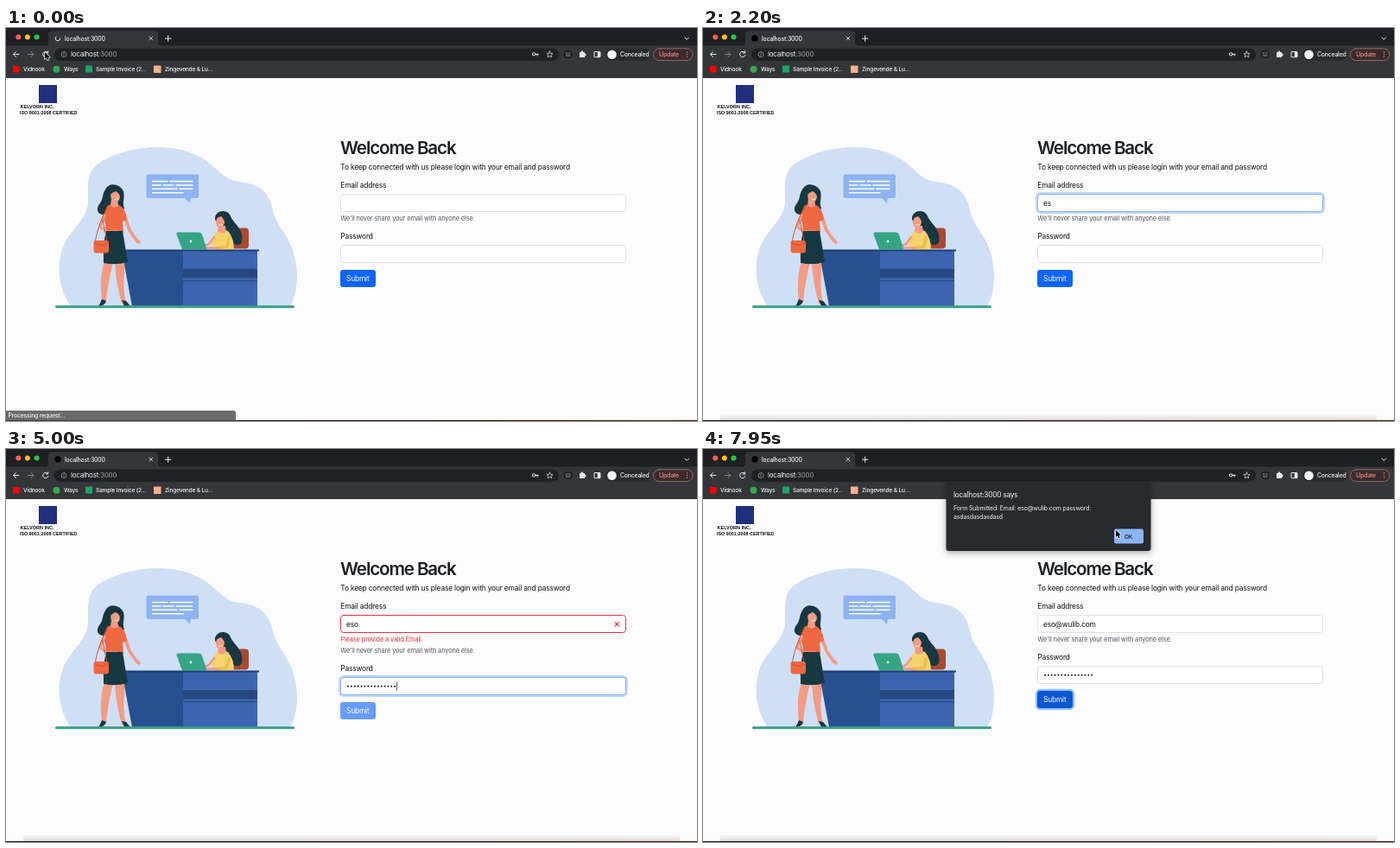
An HTML page with a canvas that plays this animation: 800x455 px, repeating every 8000 ms.

```html
<!DOCTYPE html>
<html lang="en">
<head>
<meta charset="utf-8">
<title>Login form</title>
<style>
html, body { margin: 0; width: 100%; height: 100%; overflow: hidden; background: #fcfcfc; }
canvas { display: block; width: 800px; height: 455px; }
</style>
</head>
<body>
<canvas id="stage"></canvas>
<script>
const LOOP = 8000;
const canvas = document.getElementById('stage');
const c = canvas.getContext('2d');
const dpr = window.devicePixelRatio || 1;
canvas.width = 800 * dpr;
canvas.height = 455 * dpr;

const EMAIL = 'eso@wulib.com';
const PASSWORD = 'asd'.repeat(5);
const FIRST_KEYS = [1500, 1620, 2400, 5650, 5850];
const emailKey = i => i < 5 ? FIRST_KEYS[i] : 5880 + (i - 4) * 100;
const passKey = i => 3560 + i * 100;
const T = { load: 650, email: 1000, pass: 3150, back: 5300, valid: emailKey(4), submit: 7000, dialog: 7700 };
const ERROR_SHIFT = 13;

// Pointer moves: start, end, then the two positions
const MOVES = [
  [0, 350, 45, 28, 45, 28],
  [350, 950, 45, 28, 454, 202],
  [950, 1500, 454, 202, 454, 202],
  [2850, 3100, 454, 202, 450, 263],
  [3100, 3560, 450, 263, 450, 263],
  [5050, 5270, 450, 263, 440, 203],
  [5270, 5650, 440, 203, 440, 203],
  [6740, 6980, 440, 203, 401, 296],
  [6980, 7140, 401, 296, 399, 301],
  [7140, 7700, 399, 301, 399, 301],
  [7700, 7930, 399, 301, 478, 94],
  [7930, 8001, 478, 94, 478, 94]
];

const clamp = v => Math.max(0, Math.min(1, v));
const ease = v => v * v * (3 - 2 * v);
const ramp = (t, start, length = 150) => ease(clamp((t - start) / length));
const between = (t, a, b) => t >= a && t < b;

function text(str, x, y, size, color, weight = 400, spacing = -0.02, family = 'Inter') {
  c.font = `${weight} ${size}px ${family}, sans-serif`;
  c.letterSpacing = `${spacing * size}px`;
  c.fillStyle = color;
  c.fillText(str, x, y);
  return c.measureText(str).width;
}

// Small labels of the browser itself
const label = (str, x, y, size, color = '#f1f3f4', weight = 500) => text(str, x, y, size, color, weight, -0.03);

function rect(x, y, w, h, color, r = 0) {
  c.fillStyle = color;
  c.beginPath();
  c.roundRect(x, y, w, h, r);
  c.fill();
}

function frame(x, y, w, h, color, r, width) {
  c.strokeStyle = color;
  c.lineWidth = width;
  c.beginPath();
  c.roundRect(x, y, w, h, r);
  c.stroke();
}

function dot(x, y, r, color) {
  c.fillStyle = color;
  c.beginPath();
  c.arc(x, y, r, 0, 7);
  c.fill();
}

function oval(x, y, rx, ry, color, angle = 0) {
  c.fillStyle = color;
  c.beginPath();
  c.ellipse(x, y, rx, ry, angle, 0, 7);
  c.fill();
}

function shape(d, color) {
  c.fillStyle = color;
  c.fill(new Path2D(d));
}

function line(d, color, width = 1) {
  c.strokeStyle = color;
  c.lineWidth = width;
  c.lineCap = c.lineJoin = 'round';
  c.stroke(new Path2D(d));
}

function drawBrowser(t) {
  rect(0, 0, 800, 21, '#1f2023');
  rect(0, 20.5, 800, 37.5, '#35363a');
  shape('M45 21Q49 21 49 17V7Q49 3.500 53 3.500H172Q176 3.500 176 7V17Q176 21 180 21Z', '#35363a');
  ['#fe5f57', '#febc2e', '#28c840'].forEach((color, i) => dot(14.300 + i * 10.600, 10.500, 3, color));

  if (t < T.load) {
    c.strokeStyle = '#d7e3fa';
    c.lineWidth = 1;
    c.beginPath();
    const a = t / 140;
    c.arc(60, 12, 2.800, a, a + 4);
    c.stroke();
  } else {
    dot(60, 12, 3.700, '#000');
  }
  label('localhost:3000', 68, 14.700, 6.900);
  line('M166 10.200l3.600 3.600M169.600 10.200l-3.600 3.600', '#e8eaed', 0.900);
  line('M184.500 12.200h6.400M187.700 9v6.400', '#e8eaed');
  line('M786 11l2.300 2.300l2.300 -2.300', '#e8eaed');

  line('M15 30.500H8.600M11.500 27.500L8.500 30.500L11.500 33.500', '#e8eaed');
  line('M25.500 30.500H31.800M28.900 27.500L31.900 30.500L28.900 33.500', '#85878b');
  line('M48.300 28.400A3.200 3.200 0 1 0 48.900 31.500M48.700 26.800V29H46.500', '#e8eaed');

  rect(56, 23.500, 584, 14.500, '#202124', 7.200);
  frame(64, 27.600, 6, 6, '#aeb1b5', 3, 0.700);
  line('M67 30.300V32M67 29.200V29.250', '#aeb1b5', 0.700);
  const w = label('localhost', 75, 33.400, 8, '#f1f3f4', 400);
  label(':3000', 75 + w, 33.400, 8, '#9aa0a6', 400);

  frame(609.500, 28.800, 3.200, 3.200, '#d5d7da', 1.600, 1.100);
  line('M613 30.400H616.200M615 30.400V32', '#d5d7da', 1.100);
  line('M629.500 27l1.050 2.300l2.500 .300l-1.850 1.700l.500 2.500l-2.200 -1.250l-2.200 1.250l.500 -2.500l-1.850 -1.700l2.500 -.300Z', '#d5d7da', 0.800);
  frame(646.800, 27, 8, 7, '#111', 1.500, 1);
  line('M648.500 32h4.600M648.500 29h1M652 29h1', '#8e9194', 0.900);
  rect(664, 28, 6.200, 6, '#e8eaed', 0.800);
  dot(667, 27.900, 1.300, '#e8eaed');
  dot(670.400, 31, 1.300, '#e8eaed');
  frame(681, 27.500, 7, 6.200, '#e8eaed', 0.600, 1);
  rect(684.800, 27.500, 3.200, 6.200, '#e8eaed');
  rect(694, 23.700, 52, 14, '#292a2d', 7);
  dot(701.500, 30.700, 5.300, '#f1f3f4');
  label('Concealed', 711, 33.300, 6.900);
  rect(749.500, 23.800, 45.500, 13.800, '#3b2b2d', 6.900);
  frame(749.500, 23.800, 45.500, 13.800, '#b98582', 6.900, 0.700);
  label('Update', 756, 33.300, 7, '#f28b82');
  [28, 30.700, 33.400].forEach(y => dot(788.500, y, 0.700, '#f28b82'));

  rect(8, 44, 7.500, 7.500, '#f00', 0);
  dot(58.500, 47.700, 4, '#34a853');
  rect(92, 43.500, 8, 8, '#1fa463');
  rect(171, 43.500, 8.500, 8.500, '#f3b28c');
  [['Vidnook', 20], ['Ways', 67], ['Sample Invoice (2...', 104], ['Zingevende & Lu...', 184]]
    .forEach(([name, x]) => label(name, x, 50.200, 6.600));
}

function drawLogo() {
  rect(38, 66, 21, 21, '#20307c');
  text('KELVORN INC.', 16.500, 93, 5.500, '#111', 700, 0, 'Liberation Sans');
  text('ISO 9001:2008 CERTIFIED', 16, 99.700, 5.400, '#111', 700, 0, 'Liberation Sans');
}

function drawSeated(dark, skin) {
  rect(261, 231.500, 20, 24, '#a94a32', 4);
  shape('M242 222C241 210 257 209 260 218C264 227 276 233 273 248C269 254 260 252 258 240L250 232Z', dark);
  shape('M243 236Q250 232 257 235Q264 243 264 257H242L237 249Z', '#f5d36d');
  shape('M246 229H254L255 236Q249 240 245 235Z', skin);
  oval(248, 224.500, 5, 6.800, skin, 0.150);
  shape('M242 221Q245 211 253 214Q259 219 255 231Q253 221 249 218Q246 219 242 221Z', dark);
  line('M246.500 228Q248.500 229.500 250.500 227.500', '#fff', 0.900);
  line('M241 242L235 250L226 254', skin, 2.800);
  line('M258 243L256 253L247 254.500', '#efbe4c', 3.800);
  line('M246 254.500H233', skin, 2.500);
}

function drawStanding(dark, skin, red) {
  shape('M115 187C119 178 132 180 136 189C138 198 134 201 137 209C133 214 121 209 118 216C107 218 103 211 108 204C113 198 111 193 115 187Z', dark);
  shape('M114 270H124C121 287 118 294 116 318L111 319C110 300 108 290 114 270Z', skin);
  shape('M126 270H137C138 286 134 297 139 318L134 319C130 302 127 292 126 270Z', skin);
  shape('M111 314L116 316Q114 322 107 322Q109 319 111 314ZM134 315L139 316L144 322H137Z', dark);
  line('M136 214L143 234L152 247M150 244L154 248', skin, 3.800);
  shape('M117 206Q124 202 131 205Q138 208 140 222L135 224L136 237H115Q117 226 112 220Z', red);
  shape('M122 198H129L130 205Q126 211 121 205Z', skin);
  oval(126.500, 194.500, 5.400, 7.400, skin, -0.100);
  shape('M119 195Q120 183 129 185Q135 189 133 199Q132 191 127 189Q123 190 119 195Z', dark);
  line('M126 198.500Q128 200 130 197.500', '#fff', 0.900);
  line('M114 217L109 230L117 236L129 236', skin, 3.400);
  shape('M116 235H135L141 271Q127 275 113 272Q112 250 116 235Z', dark);
  line('M103 248Q107 226 118 206M117 247L112 222', '#c9482c', 0.900);
  rect(101.500, 246, 17.500, 14.500, red, 3);
  line('M103 249Q110 254 118 249', '#c9482c', 0.800);
}

function drawPicture() {
  const dark = '#173841', skin = '#f39b83', red = '#ee6842';
  shape('M75 322C60 302 57 269 69 247C79 230 92 222 95 203C96 185 91 167 108 156C142 135 194 132 224 149C247 161 248 175 270 178C296 181 305 192 309 211C313 229 325 237 332 257C340 282 338 307 329 322Z', '#cfdff6');

  rect(162.500, 169.500, 60.500, 27.500, '#8db3f2', 2);
  shape('M206 196H214L213 203Z', '#8db3f2');
  line('M169.500 177.500H187M190 177.500H216M169.500 182H179M182 182H194M197 182H216M169.500 186.300H198M201 186.300H216M169.500 190.700H205', '#fff', 1.400);

  drawSeated(dark, skin);
  shape('M199 236.500H223Q226 236.500 227 239L232.500 256.500H204L197.500 239Q197 236.500 199 236.500Z', '#35a585');
  dot(214, 247, 1.400, '#e8faf4');

  // Desk
  shape('M134 258H205V322H146Z', '#27508f');
  rect(205, 258, 86, 64, '#3c64b0');
  rect(205, 279, 86, 10.500, '#27477f');
  rect(205, 292, 86, 1.200, '#27508f');
  rect(133, 256.500, 160, 2, '#203f77');

  drawStanding(dark, skin, red);
  rect(57, 321.300, 277, 2.900, '#3b9f88', 1.400);
}

function drawField(y, focus, invalid) {
  const box = (color, width, grow = 0) =>
    frame(387.5 - grow, y - grow, 330 + 2 * grow, 20 + 2 * grow, color, 3.200 + grow, width);
  if (focus > 0) box(`rgba(${invalid ? '220,53,69' : '13,110,253'},${0.27 * focus})`, 2.200, 1.300);
  rect(387.5, y, 330, 20, '#fff', 3.200);
  box(invalid ? '#dc3545' : '#dee2e6', 1);
  if (!invalid) box(`rgba(134,183,254,${focus})`, 1);
}

function drawCaret(t, x, y, reset) {
  if ((t - reset) % 1000 < 500) rect(x, y - 5, 0.700, 10, '#111');
}

function drawForm(t) {
  const ink = '#0c0f12';
  const error = between(t, T.pass, T.valid);
  const shift = error ? ERROR_SHIFT : 0;
  const emailFocus = ramp(t, T.email) - ramp(t, T.pass) + ramp(t, T.back) - ramp(t, T.submit);
  const passFocus = ramp(t, T.pass) - ramp(t, T.back);
  const submitFocus = ramp(t, T.submit);

  text('Welcome Back', 387, 146, 20.6, '#1b1f23', 600, -0.055);
  text('To keep connected with us please login with your email and password', 387.300, 163.800, 8.400, ink);
  text('Email address', 387.300, 185, 8.400, ink);
  drawField(192.5, emailFocus, error);

  const typed = [...EMAIL].filter((_, i) => t >= emailKey(i)).length;
  const w = text(EMAIL.slice(0, typed), 394, 205.800, 8.400, ink);
  if (between(t, T.email, T.pass) || between(t, T.back, T.submit)) {
    const last = typed ? emailKey(typed - 1) : 0;
    drawCaret(t, 394.400 + w, 202.700, Math.max(last, t < T.back ? T.email : T.back));
  }
  if (error) {
    line('M705.300 200.600l4.200 4.200M709.500 200.600l-4.200 4.200', '#dc3545', 1.300);
    text('Please provide a valid Email.', 387.300, 223.200, 7.450, '#dc3545');
  }
  text("We'll never share your email with anyone else.", 387.300, 223.200 + shift, 7.450, '#555b61');

  text('Password', 387.300, 244 + shift, 8.400, ink);
  const passY = 251.5 + shift;
  drawField(passY, passFocus, false);
  const dots = [...PASSWORD].filter((_, i) => t >= passKey(i)).length;
  for (let i = 0; i < dots; i++) dot(396 + i * 3.870, passY + 10.300, 0.950, ink);
  if (between(t, T.pass, T.back)) {
    drawCaret(t, 394.300 + dots * 3.870, passY + 10, dots ? passKey(dots - 1) : T.pass);
  }

  const y = 280 + shift;
  if (submitFocus > 0) frame(385.900, y - 1.100, 43.200, 22.200, `rgba(49,132,253,${0.5 * submitFocus})`, 4.300, 2.200);
  const hover = ramp(t, 6930);
  const blue = `rgb(${13 - 2 * hover},${101 - 15 * hover},${253 - 42 * hover})`;
  rect(387, y, 41, 20, error ? '#659cfd' : blue, 3.200);
  text('Submit', 394, y + 13, 8.400, '#fff');
}

function drawPasswordMenu() {
  c.save();
  c.shadowColor = 'rgba(0,0,0,.3)';
  c.shadowBlur = 4 * dpr;
  rect(439.500, 217.500, 140, 89.500, '#202124', 2.500);
  c.restore();
  shape('M445.500 218L450.300 213L455 218Z', '#202124');
  ['davin.morel@tezuno.com', 'ortan.selim@tezuno.com'].forEach((name, i) => {
    const y = 235 + i * 30.700;
    dot(450.300, y, 4, '#000');
    label(name, 461, y - 3, 6.900);
    for (let k = 0; k < 9 + i; k++) dot(462 + k * 3.250, y + 6.500, 0.700, '#9aa0a6');
    dot(569, y, 4, '#4285f4');
  });
  rect(439.500, 283.600, 140, 0.600, '#3c4043');
  dot(450.300, 295.500, 3.500, '#9aa0a6');
  label('Manage passwords...', 461, 298, 6.900, '#9aa0a6');
  dot(567, 295.500, 2.600, '#4285f4');
}

function drawDialog() {
  c.save();
  c.shadowColor = 'rgba(0,0,0,.4)';
  c.shadowBlur = 7 * dpr;
  c.shadowOffsetY = 1.500 * dpr;
  rect(281.500, 39, 237, 79, '#292a2d', 3);
  c.restore();
  label('localhost:3000 says', 290, 55.500, 8.300, '#f1f3f4', 400);
  text(`Form Submitted: Email: ${EMAIL} password:`, 290, 71.200, 6.950, '#f1f3f4');
  text(PASSWORD, 290, 81.300, 6.950, '#f1f3f4');
  rect(476, 92.500, 34, 17, '#8ab4f8', 2.200);
  label('OK', 488, 103.500, 6.600, '#202124');
}

function drawStatus(t) {
  c.globalAlpha = 1 - ramp(t, 780, 150);
  rect(0, 443, 266, 11.500, '#6b6b6b', [0, 2.500, 0, 0]);
  label('Processing request...', 2.500, 451, 6.900);
  c.globalAlpha = 1;
}

function drawBottomEdge(t) {
  const shade = c.createLinearGradient(0, 446, 0, 454);
  shade.addColorStop(0, 'rgba(0,0,0,0)');
  shade.addColorStop(1, `rgba(0,0,0,${0.12 * ramp(t, 780)})`);
  rect(20, 446, 760, 8, shade);
  const edge = c.createLinearGradient(0, 0, 800, 0);
  edge.addColorStop(0, '#1c1c1c');
  edge.addColorStop(0.3, '#1c1614');
  edge.addColorStop(1, '#4a1a12');
  rect(0, 454, 800, 1, edge);
}

function drawPointer(t) {
  const move = MOVES.find(m => between(t, m[0], m[1]));
  if (!move) return;
  const [a, b, x0, y0, x1, y1] = move;
  const k = ease((t - a) / (b - a));
  const x = x0 + (x1 - x0) * k, y = y0 + (y1 - y0) * k;
  const shift = between(t, T.pass, T.valid) ? ERROR_SHIFT : 0;
  const inField = x > 387 && x < 718 && (between(y, 192, 213) || between(y, 251 + shift, 272 + shift));
  c.save();
  c.translate(x, y);
  if (inField) {
    line('M-1.800 -4.300Q0 -4.300 0 -3Q0 -4.300 1.800 -4.300M0 -3V3M-1.800 4.300Q0 4.300 0 3Q0 4.300 1.800 4.300', '#111', 0.900);
  } else {
    const arrow = 'M0 0V8L1.900 6.300L3.200 9.300L4.700 8.600L3.400 5.700H5.900Z';
    line(arrow, '#fff', 1.300);
    shape(arrow, '#000');
  }
  c.restore();
}

function draw(t) {
  c.setTransform(dpr, 0, 0, dpr, 0, 0);
  rect(0, 0, 800, 455, '#fcfcfc');
  drawBrowser(t);
  drawLogo();
  drawPicture();
  drawForm(t);
  if (between(t, T.email + 30, emailKey(0))) drawPasswordMenu();
  drawBottomEdge(t);
  if (t < 930) drawStatus(t);
  if (t >= T.dialog) drawDialog();
  drawPointer(t);
}

const start = performance.now();
function tick() {
  draw((performance.now() - start) % LOOP);
  requestAnimationFrame(tick);
}
tick();
</script>
</body>
</html>
```
